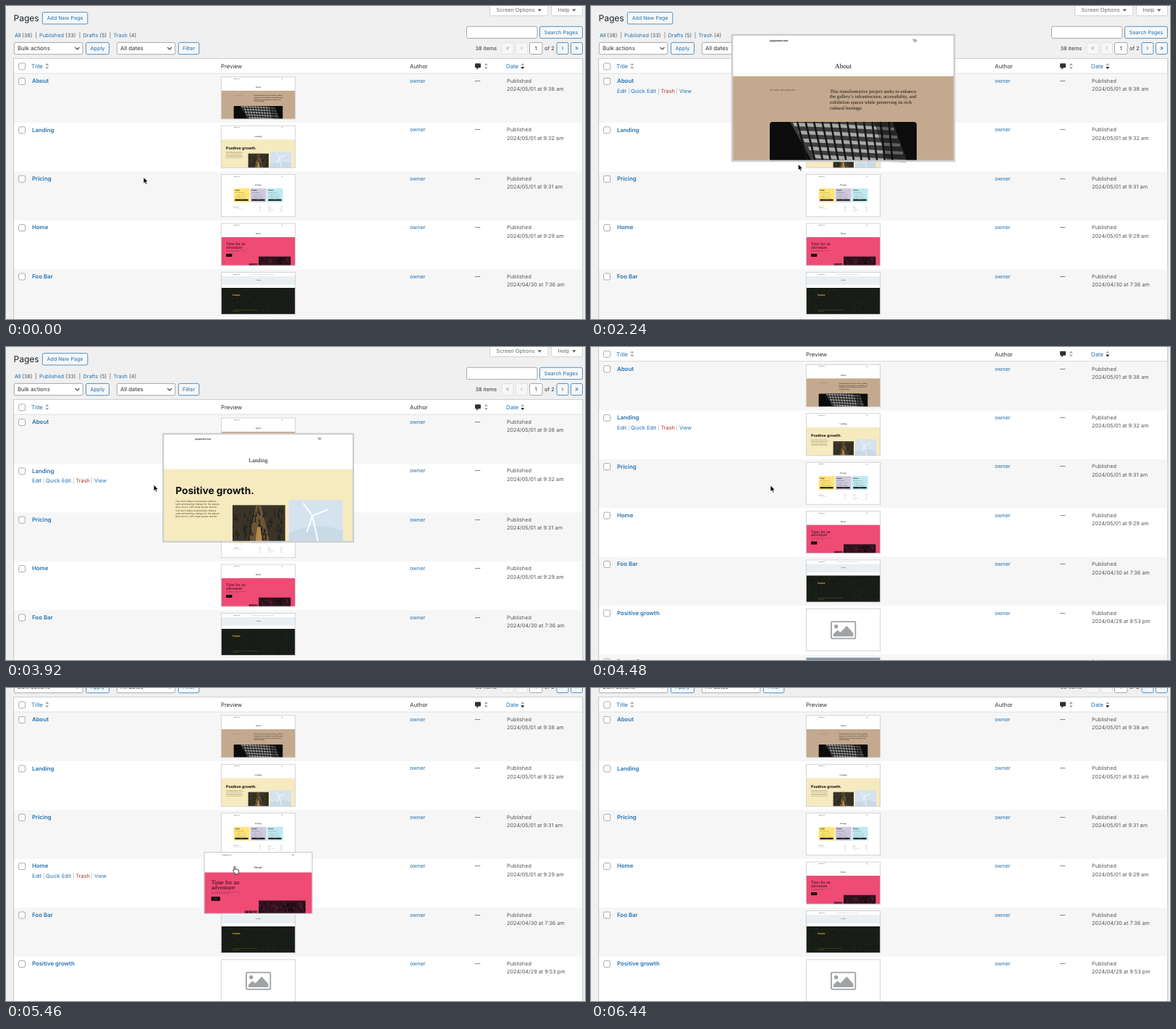
Write an HTML page that moves like this. It is 800 by 432 pixels and loops after 7000 ms.

```html
<!DOCTYPE html>
<html lang="en">
<head>
<meta charset="utf-8">
<title>Pages</title>
<style>
  html, body { margin: 0; width: 100%; height: 100%; overflow: hidden; background: #f0f0f1; }
  svg { display: block; width: 800px; height: 432px; }
  text { font-family: Inter, Roboto, sans-serif; text-rendering: geometricPrecision; white-space: pre; }
  .serif { font-family: "Liberation Serif", "Noto Serif", serif; }
  .b { font-weight: 600; }
  .bb { font-weight: 700; }
  .mid { text-anchor: middle; }
</style>
</head>
<body>
<svg id="stage" viewBox="0 0 800 432" xmlns="http://www.w3.org/2000/svg"></svg>
<script>
const LOOP = 7000, STEP = 70;
const ROW_TOP = 93.2, ROW_H = 67.4;
const THUMB = { cx: 348.5, cy: 126.9, w: 307, h: 174 };
const BLUE = '#2271b1', INK = '#2c3338', GREY = '#50575e', LINE = '#c3c4c7', FIELD = '#8c8f94';

// ---------- drawing helpers ----------
const text = (x, y, str, size = 7.3, fill = INK, cls = '', extra = '') =>
  `<text x="${x}" y="${y}" font-size="${size}" fill="${fill}" class="${cls}" ${extra}>${str}</text>`;
const rect = (x, y, w, h, fill, stroke = 'none', r = 0, sw = .75) =>
  `<rect x="${x}" y="${y}" width="${w}" height="${h}" rx="${r}" fill="${fill}" stroke="${stroke}" stroke-width="${sw}"/>`;
const path = (d, fill = 'none', stroke = 'none', sw = 1) =>
  `<path d="${d}" fill="${fill}" stroke="${stroke}" stroke-width="${sw}" stroke-linejoin="round"/>`;
const button = (x, y, w, h, label, size = 7.3) =>
  rect(x, y, w, h, '#f6f7f7', BLUE, 2) + text(x + w / 2, y + h / 2 + 2.6, label, size, BLUE, 'mid');
const chevron = (x, y) => path(`M${x - 3} ${y - 1.5}l3 3l3 -3`, 'none', GREY, 1.2);
const range = (n, fn) => Array.from({ length: n }, (_, i) => fn(i)).join('');
const random = seed => () => (seed = (seed * 16807) % 2147483647) / 2147483647;

const sorter = (x, y, active) =>
  path(`M${x - 2.4} ${y - 1}h4.8l-2.4 -3.2z`, '#a7aaad') +
  path(`M${x - 2.4} ${y + 1}h4.8l-2.4 3.2z`, active ? '#1d2327' : '#a7aaad');
const checkbox = y => rect(17.6, y - 4.5, 9, 9, '#fff', FIELD, 2);

// ---------- page chrome ----------
function views() {
  const items = [['All', 12, '(38)', 22], ['Published', 46, '(33)', 82], ['Drafts', 106.5, '(5)', 129.5], ['Trash', 148.5, '(4)', 170]];
  return items.map(([name, x, count, cx], i) =>
    text(x, 42.6, name, 7.3, i ? BLUE : '#135e96') + text(cx, 42.6, count, 7.3, GREY) +
    (i ? text(x - 5.8, 42.6, '|', 7.3, GREY) : '')).join('');
}

function tab(x, w, label) {
  return rect(x, -3, w, 16.5, '#fff', LINE, 2) + text(x + 9, 8.2, label, 7.3, '#646970') +
    path(`M${x + w - 14.5} 4.2h5.6l-2.8 3.6z`, '#646970');
}

function pager(x, label, enabled) {
  return rect(x, 50.5, 16, 16, '#f6f7f7', enabled ? BLUE : '#dcdcde', 2) +
    text(x + 8, 61.2, label, 9, enabled ? BLUE : '#a7aaad', 'mid');
}

function toolbar() {
  return text(10.5, 21.3, 'Pages', 12, '#1d2327') + button(50.3, 8.7, 62.5, 16.2, 'Add New Page', 7.1) +
    tab(668.5, 80.5, 'Screen Options') + tab(753.5, 43, 'Help') + views() +
    rect(636.5, 28.3, 97.5, 16.3, '#fff', FIELD, 2) + button(737.5, 28.3, 59, 16.3, 'Search Pages', 7.1) +
    rect(11.3, 50.4, 94.8, 16.3, '#fff', FIELD, 2) + text(16, 61.3, 'Bulk actions', 7.8) + chevron(98.5, 58.5) +
    button(110.5, 50.4, 32, 16.3, 'Apply') +
    rect(153.3, 50.4, 80.5, 16.3, '#fff', FIELD, 2) + text(158, 61.3, 'All dates', 7.8) + chevron(226, 58.5) +
    button(238.3, 50.4, 28.5, 16.3, 'Filter') +
    text(648.5, 61.2, '38 items') + pager(685, '«') + pager(704.5, '‹') +
    rect(723.5, 50.5, 17.5, 16, '#fff', FIELD, 2) + text(732.2, 61.2, '1', 7.3, INK, 'mid') +
    text(744, 61.2, 'of 2') + pager(761, '›', true) + pager(780.5, '»', true);
}

function tableHead() {
  return rect(10.6, 72.6, 786.3, 460, '#fff', LINE) + checkbox(83.4) +
    text(35, 86.2, 'Title', 7.8, BLUE) + sorter(56.8, 83) +
    text(297, 86.2, 'Preview', 7.8) + text(558, 86.2, 'Author', 7.8) +
    path('M649 79.3h6q1 0 1 1v4q0 1 -1 1h-2.3l-2.4 2.6v-2.6h-1.3q-1 0 -1 -1v-4q0 -1 1 -1z', INK) + sorter(663.3, 83) +
    text(691, 86.2, 'Date', 7.8, BLUE) + sorter(713.8, 83, true) +
    path('M11 93.2H796.5', 'none', LINE, .75);
}

const pages = [
  ['About', '2024/05/01 at 9:38 am'], ['Landing', '2024/05/01 at 9:32 am'],
  ['Pricing', '2024/05/01 at 9:31 am'], ['Home', '2024/05/01 at 9:29 am'],
  ['Foo Bar', '2024/04/30 at 7:36 am'], ['Positive growth', '2024/04/29 at 9:53 pm'],
  ['Parent Page', '2024/04/29 at 9:50 pm']
];

function row([title, date], i) {
  const y = ROW_TOP + i * ROW_H;
  return (i % 2 ? '' : rect(11, y + .4, 785.5, ROW_H, '#f6f6f6')) + checkbox(y + 10.7) +
    text(36, y + 13, title, 7.85, BLUE, 'b') + text(558, y + 12.8, 'owner', 7.3, BLUE) +
    text(648, y + 12.8, '—', 7.3) + text(692, y + 12.8, 'Published', 7.3, GREY) +
    text(692, y + 24.2, date, 7.3, GREY);
}

const rowActions = text(36, 0, 'Edit', 7.3, BLUE) + text(55, 0, 'Quick Edit', 7.3, BLUE) +
  text(96.5, 0, 'Trash', 7.3, '#b32d2e') + text(122, 0, 'View', 7.3, BLUE) +
  [51.2, 92.4, 117.3].map(x => text(x, 0, '|', 7, '#a7aaad')).join('');

// ---------- page previews, drawn at full zoom ----------
const siteHead = title => text(52, 9.3, 'pluginstest.test', 3.3, '#111', 'bb') +
  path('M249.5 6h1.2l.8 3.2h2.4l.7 -2.3h-3.4M252 10.6h.1M253.6 10.6h.1', 'none', '#222', .6) +
  text(153.5, 46, title, 9.2, '#111', 'serif mid');

function trees(x, y, w, h, n, color, seed) {
  const rnd = random(seed);
  return range(n, () => {
    const tx = x + rnd() * (w - 3), ty = y + rnd() * (h - 8), len = 4 + rnd() * 10;
    return path(`M${tx + 1.5} ${ty}l1.5 ${Math.min(len, y + h - ty)}h-3z`, color);
  });
}

// Pale floor slabs, broken by dark leaning columns.
function facade() {
  const slabs = range(5, i => {
    const y = 121 + i * 11;
    return path(`M${84 + i * 7} ${y}L150 ${y + 2}L${224 + i * 4} ${y + 7}v4L150 ${y + 7}L${86 + i * 7} ${y + 5}z`, '#a9a9a6');
  });
  const columns = range(12, i => path(`M${90 + i * 11.5} 120l${14 - i * .8} 54`, 'none', '#161617', 2.6));
  return path('M80 120H222L242 174H110z', '#3c3c3c') + slabs + columns +
    path('M196 120H224L244 174H214z', 'rgba(10,10,11,.45)');
}

function about() {
  const copy = ['This transformative project seeks to enhance', 'the gallery’s infrastructure, accessibility, and',
    'exhibition spaces while preserving its rich', 'cultural heritage.'];
  return siteHead('About') + rect(0, 57, 307, 117, '#c4a98e') +
    text(52, 77, 'UPTOWN ART MUSEUM', 2.5, '#3b3028', '', 'letter-spacing=".35"') +
    copy.map((line, i) => text(135, 79.7 + i * 7.7, line, 6.7, '#17120e', 'serif')).join('') +
    path('M52 174V124q0 -4 4 -4H251q4 0 4 4V174z', '#0c0c0d') + facade();
}

function landing() {
  const lines = ['Our work helps local people make a', 'calm and lasting change for the places', 'they live in, with clean power and air.'];
  return siteHead('Landing') + rect(0, 57, 307, 117, '#f6eabf') +
    text(20, 97, 'Positive growth.', 16, '#111', 'bb') +
    range(2, p => lines.map((line, i) => text(20, 110 + p * 15 + i * 4.5, line, 3.9, '#49452f')).join('')) +
    rect(112, 115, 85, 59, '#3a3428') + path('M150 115h8l14 59h-34z', '#6b5537') +
    trees(112, 115, 85, 57, 70, '#24231b', 7) + path('M152 150h5l3 24h-11z', '#b58a4c') +
    rect(203, 107, 87, 67, '#d5e3ef') + path('M203 160q44 -20 87 -4v18h-87z', '#c9dae7') +
    path('M241 132L250 174M241 132L226 112M241 132L266 122M241 132L232 158', 'none', '#fff', 2.2);
}

function pricing() {
  const plans = [['Single', 'Enrich our growing community.', '#ffe578'], ['Family', 'Support special exhibitions.', '#cfc9dd'],
    ['Patron', 'Take support to the next level.', '#bfe9f0']];
  const perks = ['General admission and member entry', 'for one adult', 'One free ticket to special exhibition', 'Two single-use guest passes per year'];
  const links = [[157, 'About', 'Team', 'History', 'Careers'], [193, 'Privacy', 'Privacy Policy', 'Terms and Conditions', 'Contact Us'],
    [245, 'Social', 'Friends', 'Pictures', 'Updates']];
  return siteHead('Pricing') +
    plans.map(([name, note, color], i) => {
      const x = 52 + i * 69;
      return rect(x, 57, 66, 57, color) + text(x + 5, 68, name, 7.4, '#111', 'serif b') +
        text(x + 5, 76, note, 2.5, '#111', 'b') +
        perks.map((perk, k) => text(x + 10, 85.5 + k * 4.6, perk, 2.4, '#333') +
          (k === 1 ? '' : `<circle cx="${x + 7}" cy="${84.6 + k * 4.6}" r=".6"/>`)).join('') +
        rect(x + 5, 102, 55, 6.2, '#0c0c0c', 'none', .8) + text(x + 32.5, 106.2, 'Join now', 2.7, '#fff', 'mid b');
    }).join('') +
    text(52, 136, 'pluginstest.test', 2.9, '#111', 'bb') + text(52, 143, 'Your curated online space title', 2.4, '#555') +
    links.map(([x, ...names]) => names.map((name, k) =>
      text(x, 135.6 + k * 6.2, name, k ? 2.4 : 2.8, '#222', k ? '' : 'b')).join('')).join('');
}

function home() {
  return siteHead('Home') + rect(0, 57, 307, 117, '#ee4b75') +
    text(20, 90, 'Time for an', 17, '#240711', 'serif') + text(20, 104.5, 'adventure', 17, '#240711', 'serif') +
    text(20, 113, 'Discover hidden places and quiet trails in the forest', 3.4, '#5b1429') +
    text(20, 118, 'with a guide who knows the way.', 3.4, '#5b1429') +
    rect(20, 126, 25, 11.5, '#0d0608', 'none', 1) + text(32.5, 133.2, 'Join us', 3.6, '#fff', 'mid') +
    rect(155, 137, 133, 37, '#32131f') + trees(155, 137, 133, 37, 70, '#13080d', 21) + trees(155, 137, 133, 37, 22, '#6b2238', 40) +
    rect(115, 165, 36, 9, '#8e2c48') + trees(115, 165, 36, 9, 12, '#3d1220', 9);
}

function fooBar() {
  return text(52, 9.3, 'pluginstest.test', 3.3, '#111', 'bb') +
    text(125, 9.3, 'Home   About   Landing   Pricing   Positive growth   Contact', 3.3, '#555') +
    rect(0, 16, 307, 36, '#e9eff3') + text(153.5, 33, 'Foo Bar', 5, '#222', 'mid b') +
    rect(0, 64.5, 307, 109.5, '#191d18') + trees(0, 64.5, 307, 109, 130, '#111511', 5) + trees(0, 64.5, 307, 109, 50, '#262d23', 77) +
    text(48, 98, 'Forest.', 9.4, '#f0d338', 'bb') +
    text(48, 158, 'A quiet walk among the tall trees, far away from the town', 3.8, '#c9b236') +
    text(48, 163.5, 'and open to all.', 3.8, '#c9b236');
}

const placeholder = () => rect(104, 53, 100, 70, '#fff', '#a0a3a5', 4, 5.5) +
  '<circle cx="124" cy="73" r="8" fill="#a0a3a5"/>' +
  path('M113 114V104L130 88L142 98L168 70L195 100V114z', '#a0a3a5');

const previews = [about, landing, pricing, home, fooBar, placeholder, () => rect(0, 0, 307, 174, '#7f90a5')];
const thumb = (draw, i) => `<g id="thumb${i}">${rect(0, 0, THUMB.w, THUMB.h, '#fff')}${draw()}` +
  `${rect(0, 0, THUMB.w, THUMB.h, 'none', '#cdced0', 0, 2.6)}</g>`;

// ---------- scene ----------
const arrow = path('M0 0V8.6L2 6.8L3.4 9.9L4.9 9.2L3.5 6.2H6.2z', '#000', '#fff', .7);
const hand = path('M-1 .8q0 -1 .9 -1t.9 1v3q.2 -.6 .9 -.5t.8 .7q.2 -.5 .9 -.4t.8 .7q.3 -.3 .8 -.2t.6 .8v2.2q0 1.2 -.7 2v1.4h-4.6v-1.2q-1.4 -1.2 -2.4 -3.2q-.5 -1 .1 -1.4t1 .6z',
  '#fff', '#111', .8);

const stage = document.getElementById('stage');
stage.innerHTML = rect(0, 0, 800, 432, '#f0f0f1') +
  `<g id="page">${toolbar()}${tableHead()}${pages.map(row).join('')}` +
  path('M10.6 72.5V540M796.9 72.5V540', 'none', LINE, .75) +
  `<g id="actions">${rowActions}</g><g id="thumbs">${previews.map(thumb).join('')}</g></g>` +
  `<g id="cursor"><g id="arrow">${arrow}</g><g id="hand">${hand}</g></g>`;

const el = id => document.getElementById(id);
const page = el('page'), actions = el('actions'), thumbs = el('thumbs'), cursor = el('cursor');
const thumbEls = previews.map((_, i) => el('thumb' + i));

// ---------- motion ----------
const clamp = v => Math.max(0, Math.min(1, v));
const ease = p => (p = clamp(p)) * p * (3 - 2 * p);

// keys: [time, ...values]
function along(keys, t) {
  const next = keys.findIndex(key => key[0] > t);
  if (next < 0) return keys[keys.length - 1].slice(1);
  if (next === 0) return keys[0].slice(1);
  const a = keys[next - 1], b = keys[next], p = ease((t - a[0]) / (b[0] - a[0]));
  return a.slice(1).map((v, i) => v + (b[i + 1] - v) * p);
}

const cursorPath = [
  [0, 190, 236.4], [350, 187, 239], [1120, 187, 239], [1610, 300, 148], [1890, 303, 160], [2030, 303, 160],
  [2240, 286.3, 218.2], [2500, 300, 245], [2800, 287.5, 256.5], [3150, 287.5, 256.5], [3360, 290, 172], [3500, 299, 186],
  [3830, 192, 190], [4130, 248, 191], [5320, 248, 191], [5460, 316, 246.5], [5740, 316, 246.5], [6230, 330, 445]
];
const handSpans = [[350, 1150], [1600, 2200], [2480, 3340], [3490, 3810], [5350, 5990]];
const scrollKeys = [[4200, 0], [4480, 73.5], [4550, 73.5], [5100, 60]];
const hoverKeys = [[0, -1], [1190, 2], [1290, 1], [1450, 0], [2280, 1], [2440, 2], [3380, 1], [4620, 2], [5350, 3], [6230, -1]];
const zooms = [[0, 1590, 2245], [2, 2500, 3360], [1, 3500, 3830], [3, 5367, 6000]];
const ZOOM_MS = 300;

function render(ms) {
  const t = Math.floor((ms % LOOP) / STEP) * STEP;
  page.setAttribute('transform', `translate(0 ${-along(scrollKeys, t)[0]})`);

  const scales = previews.map(() => 1);
  for (const [i, start, end] of zooms)
    scales[i] += 2 * (ease((t - start) / ZOOM_MS) - ease((t - end) / ZOOM_MS));
  scales.forEach((scale, i) => {
    const k = scale / 3, x = THUMB.cx - THUMB.w * k / 2, y = THUMB.cy + i * ROW_H - THUMB.h * k / 2;
    thumbEls[i].setAttribute('transform', `translate(${x} ${y}) scale(${k})`);
  });
  const largest = thumbEls[scales.indexOf(Math.max(...scales))];
  if (thumbs.lastChild !== largest) thumbs.appendChild(largest);

  const hovered = hoverKeys.filter(key => key[0] <= t).pop()[1];
  actions.setAttribute('visibility', hovered < 0 ? 'hidden' : 'visible');
  actions.setAttribute('transform', `translate(0 ${ROW_TOP + hovered * ROW_H + 26.8})`);

  const [x, y] = along(cursorPath, t);
  const pointing = handSpans.some(([a, b]) => t >= a && t < b);
  cursor.setAttribute('transform', `translate(${x} ${y})`);
  el('arrow').setAttribute('visibility', pointing ? 'hidden' : 'visible');
  el('hand').setAttribute('visibility', pointing ? 'visible' : 'hidden');
}

const began = performance.now();
function tick() {
  render(performance.now() - began);
  requestAnimationFrame(tick);
}
tick();
</script>
</body>
</html>
```
